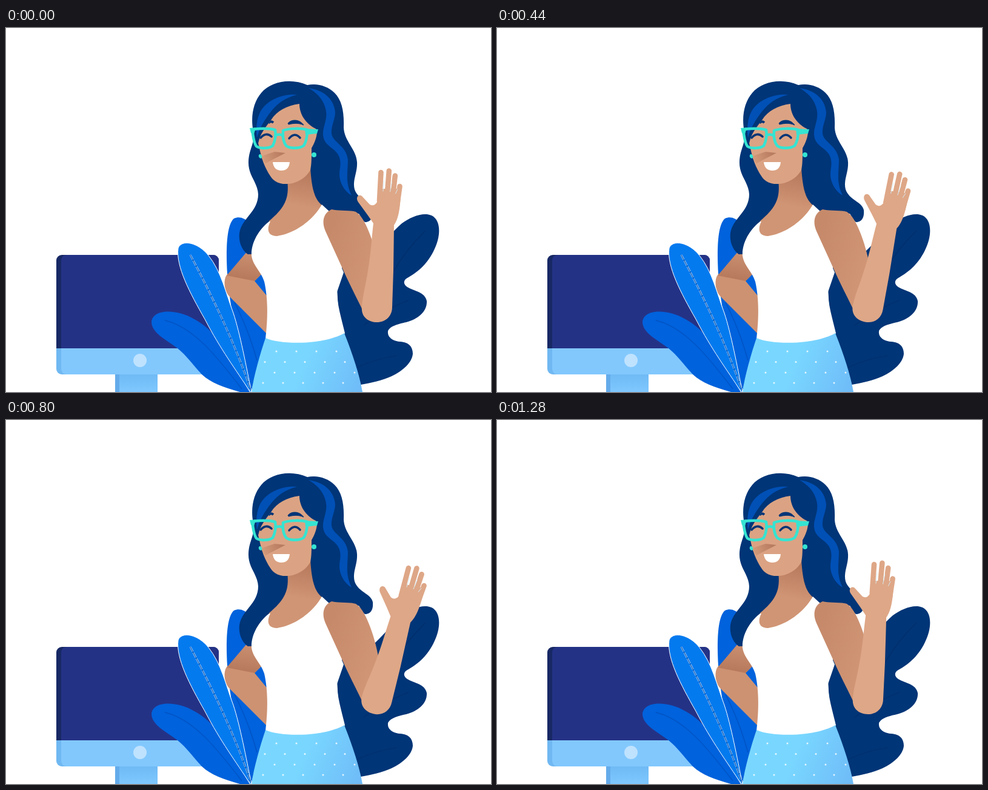
An HTML page for the animation above (1.32 s loop, 800 by 600 pixels).

```html
<!DOCTYPE html>
<html lang="en">
<head>
<meta charset="utf-8">
<title>Waving woman</title>
<style>
html, body { margin: 0; width: 100%; height: 100%; overflow: hidden; background: #fff; }
svg { display: block; width: 800px; height: 600px; }
</style>
</head>
<body>
<svg viewBox="0 0 800 600" xmlns="http://www.w3.org/2000/svg">
  <defs>
    <linearGradient id="neckShade" gradientUnits="userSpaceOnUse" x1="488" y1="238" x2="478" y2="292">
      <stop offset="0" stop-color="#b87a5d"/><stop offset="1" stop-color="#d09575"/>
    </linearGradient>
    <linearGradient id="hipArm" gradientUnits="userSpaceOnUse" x1="400" y1="372" x2="394" y2="412">
      <stop offset="0" stop-color="#c98e6f"/><stop offset="1" stop-color="#b87a5d"/>
    </linearGradient>
    <linearGradient id="upperArm" gradientUnits="userSpaceOnUse" x1="530" y1="350" x2="612" y2="375">
      <stop offset="0" stop-color="#c68a6b"/><stop offset="1" stop-color="#d09575"/>
    </linearGradient>
    <linearGradient id="noseShade" gradientUnits="userSpaceOnUse" x1="454" y1="207" x2="424" y2="218">
      <stop offset="0" stop-color="#b87c60"/><stop offset="1" stop-color="#d39a7a"/>
    </linearGradient>
    <linearGradient id="skirt" gradientUnits="userSpaceOnUse" x1="490" y1="550" x2="585" y2="590">
      <stop offset="0" stop-color="#79d7ff"/><stop offset="1" stop-color="#6fbcf8"/>
    </linearGradient>
    <linearGradient id="stand" x1="0" y1="0" x2="0" y2="1">
      <stop offset="0" stop-color="#70baf5"/><stop offset="1" stop-color="#7fc8ff"/>
    </linearGradient>
    <clipPath id="monitorShape"><rect x="83" y="374" width="268" height="197" rx="9"/></clipPath>
    <clipPath id="faceShape"><use href="#face"/></clipPath>
  </defs>

  <!-- monitor -->
  <rect x="180" y="571" width="70" height="30" fill="url(#stand)"/>
  <rect x="180" y="571" width="7" height="30" fill="#64abeb"/>
  <g clip-path="url(#monitorShape)">
    <rect x="83" y="374" width="268" height="154" fill="#172864"/>
    <rect x="83" y="528" width="268" height="43" fill="#70b8f2"/>
    <path d="M91 528V384Q91 374 101 374H351V528Z" fill="#243286"/>
    <path d="M91 528H351V571H101Q91 571 91 561Z" fill="#82c8fd"/>
  </g>
  <circle cx="221" cy="548" r="11" fill="#bfe2fe"/>

  <!-- plants behind -->
  <path d="M366 420C362 370 363 325 376 314C390 307 408 320 415 350L440 480L428 520L404 600C392 560 374 490 366 420Z" fill="#0062dc"/>
  <path d="M377 452Q401 500 414 548" fill="none" stroke="#0053c4" stroke-width="1.5"/>
  <path d="M545 410L590 335C600 340 603 356 603 371L608 368C626 351 638 335 653 322C668 311 688 303 702 309C718 317 717 343 707 364C695 391 676 404 662 412C655 416 655 422 662 427C674 434 691 435 694 450C695 467 680 480 660 485C646 488 632 492 630 500C629 510 638 516 650 517C665 518 671 526 671 537C670 551 655 565 636 574C620 581 603 585 585 588L550 500Z" fill="#003577"/>
  <path d="M692 334Q660 365 640 400M664 449Q628 462 590 490M645 540Q610 545 578 560" fill="none" stroke="#002e6b" stroke-width="1.2"/>

  <!-- arm on hip -->
  <path d="M366 405C358 411 359 432 368 442L430 504L434 446L410 417L423 404Z" fill="#cd9272"/>
  <path d="M398 368L364 408L410 417L423 404L410 372Z" fill="url(#hipArm)"/>

  <!-- hair -->
  <path d="M497 94C470 82 437 88 421 107C408 122 403 146 408 171C411 190 401 198 400 220C399 243 415 254 416 274C416 303 389 313 385 338C383 355 391 368 399 373L425 372L540 315L582 306C587 314 590 321 594 320C603 319 606 311 605 300C602 286 581 284 575 266C571 251 580 238 579 221C578 200 558 187 557 164C558 138 554 119 542 107C530 95 512 91 497 94Z" fill="#003577"/>
  <path d="M499 99C523 102 541 116 543 139C543 151 536 161 537 174C539 189 561 193 564 217C564 239 559 253 570 276C558 269 550 255 550 241C550 231 554 223 549 211C543 197 524 195 523 176C522 164 530 152 528 138C526 121 515 108 499 99Z" fill="#0050b6"/>
  <path d="M480 110C455 108 431 119 420 137C413 150 412 166 414 181C418 166 425 154 433 143C445 126 459 115 480 110Z" fill="#0050b6"/>

  <!-- neck and chest -->
  <path d="M464 250C467 278 463 294 434 318L428 350L505 350L528 302L521 292C507 280 504 260 502 230Z" fill="url(#neckShade)"/>

  <!-- head -->
  <path id="face" d="M484 125C484 143 495 158 511 166C516 171 510 188 504 198C504 215 504 225 502 234C495 248 477 257 464 257C450 258 441 252 436 244C427 231 421 214 418 198L416 190C419 175 426 166 437 152C447 136 463 128 484 125Z" fill="#dba383"/>
  <g clip-path="url(#faceShape)">
    <path d="M443 204L461 206L428 223L419 212Z" fill="url(#noseShade)"/>
    <path d="M433 157Q436 152 441 156" fill="none" stroke="#003577" stroke-width="4"/>
  </g>
  <path d="M465 157C471 150 484 150 491 160C482 156 474 157 466 159Z" fill="#003577" stroke="#003577" stroke-linejoin="round"/>
  <path d="M467 182Q476 171 485 181M420 181Q429 171 438 179" fill="none" stroke="#003577" stroke-width="3.5" stroke-linecap="round"/>
  <path d="M440 221H468C467 231 462 235 454 235C446 235 441 230 440 221Z" fill="#fff"/>
  <g fill="#35e4d2">
    <circle cx="508" cy="209" r="4"/>
    <path d="M418 208A4 4 0 0 1 421 215A4 4 0 0 1 418 208Z"/>
    <path d="M402 165L412 164L409 175L404 173ZM493 166L515 167L513 174L494 176Z"/>
  </g>
  <g fill="none" stroke="#35e4d2" stroke-width="4.5" stroke-linejoin="round">
    <path d="M406 168C414 165 434 165 444 168C446 179 443 188 440 194C434 199 419 199 413 195C408 188 408 178 406 168Z"/>
    <path d="M457 169C468 165 488 165 497 168C497 180 495 188 491 194C484 199 468 199 462 194C457 187 456 178 457 169Z"/>
    <path d="M443 178Q450 173 458 178"/>
  </g>

  <!-- shirt and skirt -->
  <path d="M434 319C416 333 404 355 405 375C407 392 421 401 426 418C431 440 433 470 428 512L436 524H548L559 503C553 478 546 455 546 435L557 403L526 330L533 302L521 291C508 314 480 338 447 343C431 343 430 331 436 319Z" fill="#fff"/>
  <path d="M428 511C455 523 525 522 558 503C569 530 583 570 588 600H405C409 572 419 538 428 511Z" fill="url(#skirt)"/>
  <g id="dots" fill="#fff" opacity=".8"></g>

  <!-- plants in front -->
  <path d="M386 600C358 592 338 585 323 571C308 555 298 540 283 528C265 514 239 503 240 483C245 462 282 465 305 477C353 500 370 546 402 600Z" fill="#0062dc"/>
  <path d="M262 482C310 493 349 543 389 595" fill="none" stroke="#0053c4" stroke-width="1.3"/>
  <path d="M403 600C379 563 354 530 328 480C303 436 280 393 284 363C289 348 317 353 334 375C355 401 363 438 375 470C386 503 396 557 405 600Z" fill="#047aef" stroke="#fff"/>
  <g fill="none">
    <path d="M304 374C341 444 376 516 404 597" stroke="#fff" stroke-width="2.6" stroke-dasharray="9 2"/>
    <path d="M304 374C341 444 376 516 404 597" stroke="#0558bd" stroke-width="1.6"/>
  </g>

  <!-- waving arm -->
  <path d="M537 299C552 302 568 300 577 303C588 310 595 326 601 342C608 361 612 377 616 400L622 472L592 473C582 452 568 425 558 403L527 335C520 318 524 305 537 299Z" fill="url(#upperArm)"/>
  <g id="forearm" fill="#dea787" stroke="#dea787" stroke-linecap="round">
    <path d="M587 465C586 451 593 426 597 400C602 370 603 347 606 322L597 309L581 287C576 280 581 273 587 277L600 291Q607 295 612 287L614 265H648L651 274C650 300 647 315 640 325L639 400L637 460C637 475 626 485 612 485C598 485 588 477 587 465Z" stroke="none"/>
    <path d="M618.5 238L616 285M631.8 235.5L628 285M641.8 243.5L637 285M649.5 261L645 293" fill="none" stroke-width="8.6"/>
    <path d="M623.5 252L622 269M636.5 254L633.5 270M645.8 266L642.5 273" fill="none" stroke="#d5ecf5" stroke-width=".9"/>
  </g>
</svg>
<script>
const LOOP = 1320, RISE = 720, STEP = 40, SWING = 13.7;
const forearm = document.getElementById("forearm");
const dots = document.getElementById("dots");

function addDots() {
  const rows = [[446, 533, 4], [427, 550.5, 5], [443, 568, 5], [424, 585, 5]];
  for (const [x, y, count] of rows) {
    for (let i = 0; i < count; i++) {
      const dot = document.createElementNS("http://www.w3.org/2000/svg", "circle");
      dot.setAttribute("cx", x + i * 33);
      dot.setAttribute("cy", y);
      dot.setAttribute("r", 1.5);
      dots.append(dot);
    }
  }
}

function draw(now) {
  const t = Math.floor((now % LOOP) / STEP) * STEP;
  const k = t < RISE ? t / RISE : (LOOP - t) / (LOOP - RISE);
  forearm.setAttribute("transform", `rotate(${SWING * k} 611.5 459.5)`);
}

function tick() {
  draw(performance.now());
  requestAnimationFrame(tick);
}

addDots();
draw(0);
requestAnimationFrame(tick);
</script>
</body>
</html>
```
